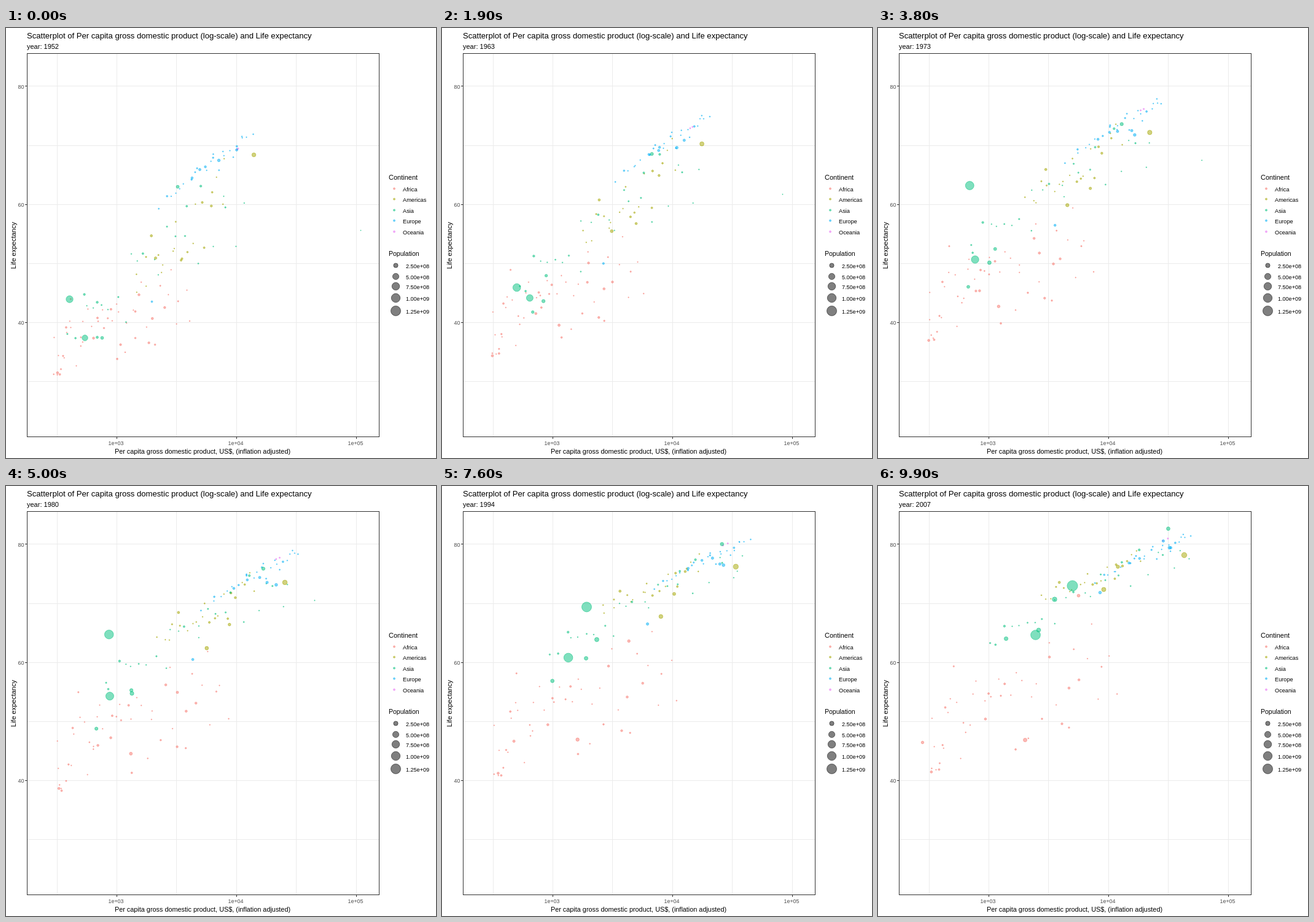
Recreate the animation shown at these times as an HTML page with a canvas. Size 700 by 700 pixels, loop 10000 ms.

```html
<!DOCTYPE html>
<html lang="en">
<head>
<meta charset="utf-8">
<title>Animated scatterplot</title>
<style>
  html, body { margin: 0; width: 100%; height: 100%; overflow: hidden; background: #fff; }
  canvas, svg { position: absolute; left: 0; top: 0; width: 700px; height: 700px; }
  text { font-family: "Liberation Sans", Arial, sans-serif; }
</style>
</head>
<body>
<canvas id="plot" width="700" height="700"></canvas>
<svg id="labels" viewBox="0 0 700 700"></svg>
<script>
const ctx = document.getElementById("plot").getContext("2d");
const svg = document.getElementById("labels");
const FRAMES = 100, STEP = 100;
const AF = "#F8766D", AM = "#A3A500", AS = "#00BF7D", EU = "#00B0F6", OC = "#E76BF3";

// ---------- helpers ----------
const lerp = (a, b, k) => a + (b - a) * k;
const easeOut = t => 1 - (1 - t) ** 1.8;

let seed = 1952;
function rand() {
  seed = (seed * 1664525 + 1013904223) % 4294967296;
  return seed / 4294967296;
}

// radius from population in millions, area scaled
const radius = pop => 0.35 + 8.2 * Math.sqrt(pop / 1319);

// ---------- moving points: each returns colour, x, y, radius at time t in 0..1 ----------
const dots = [];

// a large bubble moving through evenly timed x, y points
function track(color, pop0, pop1, ...path) {
  const legs = path.length / 2 - 1;
  dots.push(t => {
    const i = Math.min(legs - 1, Math.floor(t * legs)), k = t * legs - i, j = i * 2;
    return [color, lerp(path[j], path[j + 2], k), lerp(path[j + 1], path[j + 3], k),
      radius(lerp(pop0, pop1, t))];
  });
}

// small dots about a sloping band: x0, y0, x1, y1, half height, at start and end
function cloud(color, count, skew, from, to) {
  for (let n = 0; n < count; n++) {
    const u = ((n + rand()) / count) ** skew;
    const v = (rand() + rand() - 1) * 1.2;
    const phase = rand() * 6.28, sway = rand() * 5;
    const r = radius(3 + 45 * rand() ** 4);
    dots.push(t => {
      const e = easeOut(t);
      const [x0, y0, x1, y1, h] = from.map((a, i) => lerp(a, to[i], e));
      const drift = Math.sin(phase + t * 8) * sway * Math.min(1, h / 10);
      return [color, lerp(x0, x1, u) + drift, lerp(y0, y1, u) + v * h - drift, r];
    });
  }
}

cloud(AF, 49, 1.5, [78, 525, 300, 430, 62], [85, 410, 390, 275, 85]);
cloud(AM, 22, 1, [208, 440, 360, 235, 70], [262, 190, 430, 110, 20]);
cloud(AS, 25, 1, [90, 490, 390, 270, 70], [170, 255, 500, 95, 28]);
cloud(EU, 26, 0.8, [245, 285, 400, 172, 22], [350, 152, 508, 80, 15]);
cloud(OC, 2, 1, [374, 199, 379, 195, 1], [453, 93, 480, 82, 1]);

track(AF, 33, 135, 186, 515, 193, 460, 212, 412, 239, 413);
track(AF, 14, 65, 159, 488, 163, 430, 136, 414, 72, 417);
track(AF, 22, 80, 210, 461, 278, 337, 326, 178);
track(AM, 158, 301, 403, 206, 437, 175, 469, 139, 498, 112);
track(AM, 57, 190, 243, 374, 300, 298, 351, 231, 367, 168);
track(AM, 30, 109, 286, 375, 363, 226, 390, 131);
track(AS, 556, 1319, 103, 441, 133, 378, 119, 437, 139, 302, 147, 258, 155, 249,
  177, 235, 207, 217, 223, 204, 250, 187, 276, 172, 316, 162);
track(AS, 372, 1110, 128, 504, 153, 391, 183, 295, 256, 242);
track(AS, 82, 224, 156, 504, 171, 400, 236, 278, 287, 184);
track(AS, 86, 127, 279, 258, 387, 165, 448, 105, 472, 69);
track(AS, 41, 169, 148, 446, 203, 333, 261, 234);
track(AS, 47, 150, 148, 503, 146, 396, 208, 248);
track(AS, 1, 3, 577, 329, 537, 227, 469, 147, 506, 118);
track(EU, 69, 82, 346, 215, 439, 161, 474, 100);
track(EU, 50, 61, 375, 198, 424, 157, 476, 100);
track(EU, 48, 58, 315, 230, 412, 149, 464, 89);
track(EU, 22, 71, 237, 445, 303, 283, 361, 173);

// ---------- labels ----------
function label(str, x, y, size, anchor = "start", fill = "#000") {
  const el = document.createElementNS("http://www.w3.org/2000/svg", "text");
  const attrs = { x, y, "font-size": size, "text-anchor": anchor, fill };
  for (const key in attrs) el.setAttribute(key, attrs[key]);
  el.textContent = str;
  return svg.appendChild(el);
}

const GROUPS = [["Africa", AF], ["Americas", AM], ["Asia", AS], ["Europe", EU], ["Oceania", OC]]
  .map(([name, color], i) => [name, color, Math.round(261 + i * 17.4)]);
const SIZES = [["2.50e+08", 386], ["5.00e+08", 404], ["7.50e+08", 420], ["1.00e+09", 439], ["1.25e+09", 460]];

label("Scatterplot of Per capita gross domestic product (log-scale) and Life expectancy", 34, 17, 13.1);
const year = label("year: 1952", 34, 34, 11);
label("Per capita gross domestic product, US$, (inflation adjusted)", 320, 693, 10.86, "middle");
label("Life expectancy", 0, 0, 11, "middle").setAttribute("transform", "translate(15.5 354) rotate(-90)");
["1e+03", "1e+04", "1e+05"].forEach((s, i) => label(s, 179 + i * 195, 679, 8.9, "middle", "#4D4D4D"));
["80", "60", "40"].forEach((s, i) => label(s, 29.5, 98.5 + i * 192.4, 9, "end", "#4D4D4D"));
label("Continent", 623, 247, 11);
label("Population", 623, 371, 10.5);
GROUPS.forEach(([name, , y]) => label(name, 646, y + 4.5, 9.2));
SIZES.forEach(([name, y]) => label(name, 651, y + 5, 9.05));

// ---------- drawing ----------
function disc(color, x, y, r) {
  ctx.fillStyle = ctx.strokeStyle = color;
  ctx.beginPath();
  ctx.arc(x + 0.5, y + 0.5, r, 0, Math.PI * 2);
  ctx.fill();
  ctx.stroke();
}

function drawPanel() {
  ctx.globalAlpha = 1;
  ctx.fillStyle = "#fff";
  ctx.fillRect(0, 0, 700, 700);
  ctx.fillStyle = "#EBEBEB";
  for (let i = 0; i < 6; i++) {
    ctx.fillRect(Math.floor(83 + i * 97.4), 42, 1, 623);
    ctx.fillRect(35, Math.round(94.4 + i * 96.2), 572, 1);
  }
  ctx.lineWidth = 1;
  ctx.strokeStyle = ctx.fillStyle = "#333";
  ctx.strokeRect(34.5, 41.5, 573, 624);
  for (let i = 0; i < 3; i++) {
    ctx.fillRect(180 + i * 195, 666, 1, 3);
    ctx.fillRect(31, Math.round(94.4 + i * 192.4), 3, 1);
  }
}

let shown = -1;
function draw() {
  const frame = Math.floor(performance.now() / STEP) % FRAMES;
  if (frame !== shown) {
    shown = frame;
    const t = frame / (FRAMES - 1);
    drawPanel();
    ctx.globalAlpha = 0.5;
    for (const dot of dots) disc(...dot(t));
    for (const [, color, y] of GROUPS) disc(color, 631.5, y, 1.5);
    for (const [name, y] of SIZES) disc("#000", 634, y, radius(name / 1e6) - 0.3);
    year.textContent = "year: " + Math.round(1952 + 55 * t);
  }
  requestAnimationFrame(draw);
}
draw();
</script>
</body>
</html>
```
